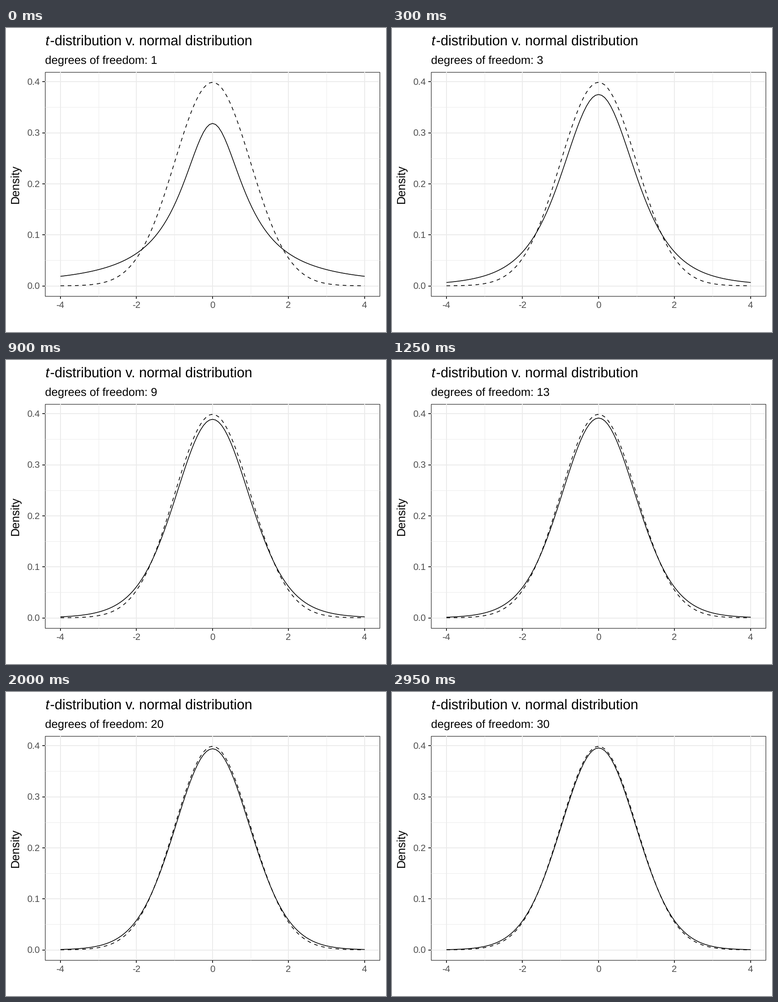
Write a matplotlib script that moves like this. It is 837 by 669 pixels and loops after 3 s.

```python
import math

import matplotlib.pyplot as plt
import numpy as np
from matplotlib.animation import FuncAnimation
from matplotlib.patches import Rectangle

W, H, DPI = 837, 669, 64
FRAMES, MAX_DF = 60, 30
LEFT, RIGHT, TOP, BOTTOM = 86.5, 823.5, 96.5, 589.5
PT = 72 / DPI  # points per pixel

plt.rcParams["font.family"] = "Liberation Sans"
plt.rcParams["text.hinting"] = "none"

fig = plt.figure(figsize=(W / DPI, H / DPI), dpi=DPI, facecolor="white")
ax = fig.add_axes([0, 0, 1, 1])
ax.set_xlim(0, W)
ax.set_ylim(H, 0)
ax.axis("off")


def px(x):
    return 455 + 83.75 * x


def py(y):
    return 567.5 - 1123 * y


def line(x, y, color, width, **kw):
    return ax.plot(x, y, color=color, lw=width * PT, solid_capstyle="butt",
                   dash_capstyle="butt", **kw)[0]


def text(x, y, s, size, color="black", **kw):
    return ax.text(x, y, s, fontsize=size * PT, color=color, **kw)


def normal_pdf(x):
    return np.exp(-x * x / 2) / math.sqrt(2 * math.pi)


def t_pdf(x, df):
    log_c = math.lgamma((df + 1) / 2) - math.lgamma(df / 2)
    c = math.exp(log_c) / math.sqrt(df * math.pi)
    return c * (1 + x * x / df) ** (-(df + 1) / 2)


def grid(xs, ys, width):
    for x in xs:
        line([px(x)] * 2, [TOP, BOTTOM], "#ebebeb", width)
    for y in ys:
        line([LEFT, RIGHT], [py(y)] * 2, "#ebebeb", width)


grid((-3, -1, 1, 3), (0.05, 0.15, 0.25, 0.35), 1)
grid((-4, -2, 0, 2, 4), (0, 0.1, 0.2, 0.3, 0.4), 2)

for v in (-4, -2, 0, 2, 4):
    line([px(v)] * 2, [BOTTOM, BOTTOM + 6], "#333333", 2)
    text(px(v) - 0.5, 616.5, str(v), 20.4, "#4d4d4d", ha="center")
for k in range(5):
    y = py(k / 10)
    line([LEFT - 6, LEFT], [y, y], "#333333", 2)
    text(75, y + 7.5, f"{k / 10:.1f}", 20.4, "#4d4d4d", ha="right")

text(86.5, 38, "t", 30.5, style="italic")
text(97.5, 38, "-distribution v. normal distribution", 30.5)
subtitle = text(86.5, 79, "", 25.2)
text(34, 343, "Density", 25.5, rotation=90, ha="right", va="center")

xs = np.linspace(-4, 4, 101)
curve = line([], [], "black", 1.6)
line(px(xs), py(normal_pdf(xs)), "black", 1.6, dashes=(5, 5))
ax.add_patch(Rectangle((LEFT, TOP), RIGHT - LEFT, BOTTOM - TOP, fill=False,
                       ec="#333333", lw=1.3 * PT))

# Each whole df sits on its nearest frame; densities blend linearly between.
dfs = np.arange(1, MAX_DF + 1)
keys = np.round((FRAMES - 1) * (dfs - 1) / (MAX_DF - 1) + 1) - 1
densities = np.array([t_pdf(xs, df) for df in dfs])


def update(i):
    pos = np.interp(i, keys, np.arange(MAX_DF))
    lo = min(int(pos), MAX_DF - 2)
    y = densities[lo] + (pos - lo) * (densities[lo + 1] - densities[lo])
    curve.set_data(px(xs), py(y))
    subtitle.set_text(f"degrees of freedom: {1 + (MAX_DF - 1) * i // (FRAMES - 1)}")
    return curve, subtitle


anim = FuncAnimation(fig, update, frames=FRAMES, interval=50, repeat=True)
plt.show()
```
